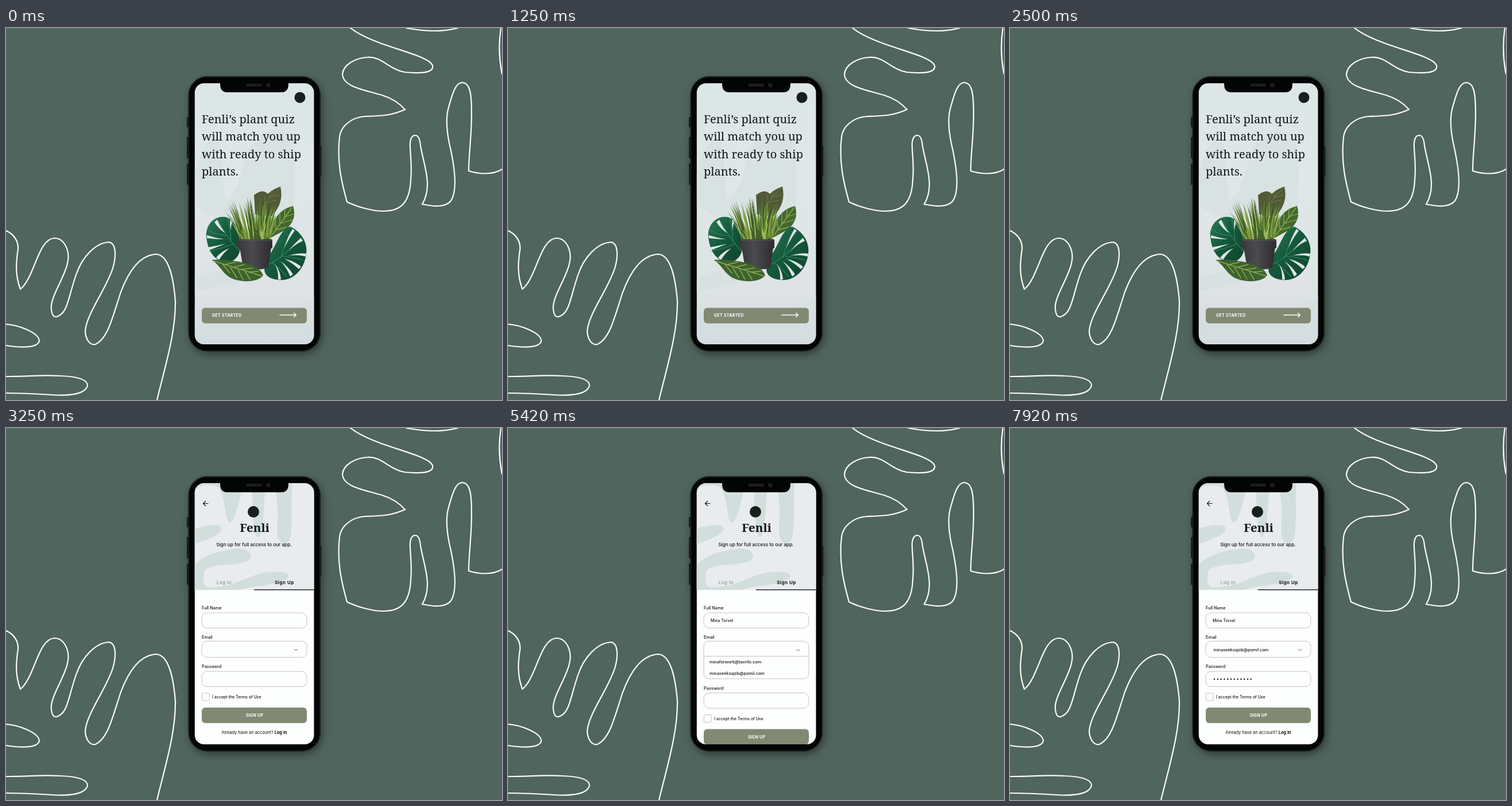
Write an HTML page that moves like this. It is 864 px wide and 648 px high and loops after 8000 ms.

```html
<!DOCTYPE html>
<html lang="en">
<head>
<meta charset="utf-8">
<title>Plant app sign-up</title>
<style>
  html, body { margin: 0; height: 100%; overflow: hidden; background: #50655d; }
  svg { display: block; width: 100vw; height: 100vh; }
  text { font: 500 7.3px Inter, sans-serif; fill: #111514; }
  .serif { font: 500 20px "Noto Serif", serif; }
  .brand { font: bold 20.5px "Noto Serif", serif; }
  .button { font-size: 7px; font-weight: 700; letter-spacing: .3px; fill: #fff; }
  .tab { font-size: 8px; font-weight: 700; letter-spacing: .5px; }
  .middle { text-anchor: middle; }
  .line { fill: none; stroke-linecap: round; stroke-linejoin: round; }
  .field { fill: #fdfefe; stroke: #bcc0b3; stroke-width: .9; }
  .phone { filter: drop-shadow(3px 5px 7px rgba(0, 0, 0, .42)); }
</style>
</head>
<body>
<svg viewBox="0 0 864 648">
  <defs>
    <clipPath id="screen"><rect x="328.800" y="96.200" width="207.700" height="454.800" rx="16"/></clipPath>
    <clipPath id="header"><rect x="328" y="95" width="209" height="187"/></clipPath>
    <clipPath id="list"><rect x="342" y="398" width="181" height="38"/></clipPath>
    <linearGradient id="paper" x2="0" y2="1">
      <stop stop-color="#dce6e7"/><stop offset=".4" stop-color="#e0e7e8"/><stop offset=".8" stop-color="#dee3e5"/><stop offset="1" stop-color="#d2d8dc"/>
    </linearGradient>
    <linearGradient id="leaf" x2="1" y2="1">
      <stop stop-color="#2b7a55"/><stop offset=".45" stop-color="#155a3d"/><stop offset="1" stop-color="#0e432d"/>
    </linearGradient>
    <linearGradient id="pot">
      <stop stop-color="#38373a"/><stop offset=".4" stop-color="#4c4a4e"/><stop offset="1" stop-color="#2d2c30"/>
    </linearGradient>
  </defs>

  <rect width="864" height="648" fill="#50655d"/>
  <g class="line" stroke="#fafcf9" stroke-width="2.200">
    <path d="M600 0C640 32 735 45 743 65C747 80 715 79 695 77C667 72 655 50 631 51C608 52 587 64 586 81C588 102 620 107 655 117C675 123 687 133 695 142C670 153 655 153 625 154C600 156 583 172 581 190C576 235 585 270 594 303C615 313 640 319 657 319C680 319 703 312 705 265C708 235 703 215 704 200C705 190 709 187 713 187C718 187 721 194 722 205C728 240 744 275 725 307"/>
    <path d="M725 307C745 311 765 313 775 301C789 280 779 230 772 200C768 180 766 155 771 138C777 118 782 95 795 95C808 96 811 112 811 150C811 190 806 220 806 249C822 254 848 257 864 246"/>
    <path d="M697 0Q750 10 787 0M862 0Q856 40 864 80"/>
    <path d="M0 353C12 358 22 370 21 385C18 405 15 428 25 455C50 435 56 366 85 366C103 367 112 390 107 410C102 435 76 470 79 490C80 500 83 504 88 503C108 497 108 470 122 430C132 400 155 374 180 373C193 376 191 400 187 415C178 450 138 500 138 530C140 545 147 553 156 551C178 540 185 505 200 460C215 420 235 395 262 394C285 396 292 440 295 475C296 530 277 590 263 648"/>
    <path d="M0 516C20 517 57 530 58 545C55 558 25 557 0 553M0 607C40 607 60 604 95 606C125 607 142 612 142 623C138 638 110 641 80 639C50 637 30 636 0 636"/>
  </g>

  <g class="phone">
    <path d="M317 155v18M317 190v37M317 236v37M547.500 205v53" stroke="#141817" stroke-width="3.500"/>
    <rect x="318.500" y="85" width="228.500" height="477.500" rx="32" fill="#030404" stroke="#181d1c" stroke-width="2"/>
  </g>

  <g clip-path="url(#screen)">
    <g id="welcome">
      <rect x="328" y="95" width="209" height="457" fill="url(#paper)"/>
      <g fill="#d6e0e2">
        <path d="M328 255C336 225 350 190 365 194C380 200 374 250 382 300C405 290 410 245 420 213C435 185 470 168 487 182C510 197 500 260 502 330H365L328 310Z" opacity=".6"/>
        <path d="M328 436C360 425 390 415 430 426C460 435 390 447 328 459ZM328 487C400 505 500 505 537 465V552H328Z" opacity=".6"/>
      </g>
      <circle cx="512" cy="121" r="9.500" fill="#17201d"/>
      <g id="headline"></g>

      <path d="M432 291Q447 279 456 289L450 325H434ZM440 327Q440 290 478 276Q485 306 462 328Z" fill="#515a37"/>
      <path d="M442 325Q453 299 477 278M450 308l2-17M459 297l3-13M453 304l19-4M462 294l14-3" class="line" stroke="#74784b"/>
      <path d="M460 366Q463 319 500 310Q508 335 486 352Z" fill="#42692d"/>
      <path d="M464 360L498 313M470 350l-1-16M477 341l0-18M485 332l1-17M470 352l18-5M479 340l20-6M488 328l13-4" class="line" stroke="#94a955" stroke-width="1.300"/>
      <g fill="url(#leaf)">
        <path d="M408 379C406 350 395 328 378 329C361 328 347 345 349 364C351 386 361 405 384 409C400 407 409 394 408 379Z"/>
        <path d="M456 398C470 385 476 350 495 346C513 354 526 373 523 393C520 421 500 439 480 439C457 439 445 428 452 411Z"/>
      </g>
      <path d="M407 388Q389 372 370 336M396 376Q375 384 355 389M384 362Q366 360 351 352M392 372Q391 350 386 333M453 414Q482 401 514 365M464 409Q478 420 489 433M482 398Q504 399 518 405M479 400Q485 374 498 352" class="line" stroke="#328460" stroke-width="1.200"/>
      <g fill="#e0e6e7">
        <path d="M382 357Q371 351 363 338L368 334Q374 348 382 357ZM392 353Q389 342 391 333L395 337Q391 344 392 353ZM380 368Q365 368 350 366L350 361Q365 366 380 368ZM382 376Q369 381 354 387L352 382Q368 379 382 376ZM389 384Q379 391 371 404L366 400Q376 388 389 384Z"/>
        <path d="M485 383Q490 365 499 350L503 353Q493 366 485 383ZM492 389Q503 374 514 366L517 371Q504 376 492 389ZM491 397Q508 391 523 393L522 398Q506 394 491 397ZM485 402Q503 406 514 416L510 420Q500 410 485 402ZM478 406Q491 415 500 429L495 433Q489 417 478 406ZM468 411Q478 423 479 438H474Q475 423 468 411Z"/>
      </g>
      <g id="grass"></g>
      <path d="M407 382H462L457 418Q434 424 413 418Z" fill="url(#pot)"/>
      <rect x="404" y="368" width="60" height="16" rx="2" fill="url(#pot)"/>
      <path d="M405 370H463" stroke="#5c5a5f"/>
      <path d="M358 404C385 402 442 408 448 431C439 443 411 444 393 436C377 428 372 412 358 404Z" fill="#3c632d"/>
      <path d="M362 406Q400 418 446 432M378 412l12 15M391 417l11 18M404 421l9 17M417 425l8 13M382 412l18-4M395 417l20-5M409 421l20-3M422 425l18-1" class="line" stroke="#91a654" stroke-width="1.500"/>

      <rect x="341" y="487.500" width="183" height="27" rx="6" fill="#828973"/>
      <text class="button" x="359" y="503">GET STARTED</text>
      <path d="M477 500H505.500M501.500 496.500L505.500 500L501.500 503.500" class="line" stroke="#fff" stroke-width="1.300"/>
    </g>

    <g id="signup">
      <rect x="328" y="95" width="209" height="457" fill="#fdfefe"/>
      <g clip-path="url(#header)">
        <rect x="328" y="95" width="209" height="187" fill="#e9ecee"/>
        <g fill="#d2dedc">
          <path d="M328 95H413C408 120 401 160 390 165C380 160 384 125 371 105C364 98 342 98 333 104L328 112Z"/>
          <path d="M428 95H452C449 130 449 188 439 190C429 189 430 135 428 95ZM469 95H499C495 130 503 195 489 200C472 204 471 185 473 160C475 135 469 115 469 95Z"/>
          <path d="M328 176C345 169 375 165 376 175C374 188 349 194 328 203ZM328 240C340 222 375 212 405 210C431 211 432 227 418 233C395 241 360 234 345 249L344 270Q348 280 360 277C400 277 415 258 455 251C485 249 497 253 490 262C471 276 430 273 408 282H328Z"/>
        </g>
      </g>
      <path d="M352 131.500H343.500M347.500 127.500L343.500 131.500L347.500 135.500" class="line" stroke="#111514" stroke-width="1.200"/>
      <circle cx="431" cy="146" r="10" fill="#17201d"/>
      <text class="brand middle" x="433" y="181">Fenli</text>
      <text class="middle" x="432" y="205.500" style="font-size:8.200px">Sign up for full access to our app.</text>
      <text class="tab middle" x="380" y="271.500" style="fill:#a0a8a8">Log In</text>
      <text class="tab middle" x="485" y="271.500">Sign Up</text>
      <path d="M432 281.700H537" stroke="#1d2925" stroke-width="1.400"/>

      <text x="341" y="316">Full Name</text>
      <rect class="field" x="341" y="322" width="183" height="26.500" rx="9"/>
      <text id="fullName" x="353" y="338.300" style="font-size:7px">Mina Torvel</text>
      <text x="341" y="367">Email</text>
      <rect id="emailBox" class="field" x="341" y="371.300" width="183" height="28.200" rx="9"/>
      <path id="chevron" class="line" stroke="#4b504e" stroke-width=".9"/>
      <text id="email" x="354.500" y="389">minaseeksajob@pomil.com</text>
      <g id="dropdown">
        <path d="M341 397.700H524" stroke="#bcc0a9" stroke-width=".9"/>
        <g clip-path="url(#list)"><g id="options">
          <text x="351" y="407.700">minaforwork@tavrilo.com</text>
          <text x="351" y="428">minaseeksajob@pomil.com</text>
        </g></g>
      </g>
      <g id="lower">
        <text x="341" y="418">Password</text>
        <rect class="field" x="341" y="424" width="183" height="26.500" rx="9"/>
        <path id="password" d="M356 437.500H421" class="line" stroke="#111514" stroke-width="2.500" stroke-dasharray="0 5.800"/>
        <rect class="field" x="341.300" y="462" width="13" height="13" rx="1.500"/>
        <text x="359" y="471" style="font-size:7px">I accept the Terms of Use</text>
        <rect x="341" y="487" width="183" height="27" rx="6" fill="#828973"/>
        <text class="button middle" x="433" y="503">SIGN UP</text>
        <text class="middle" x="432.500" y="532.500" style="font-size:7.400px;font-weight:400">Already have an account? <tspan font-weight="700">Log In</tspan></text>
      </g>
    </g>
  </g>

  <path d="M373 94H492V98Q492 112 479 112H386Q373 112 373 98Z" fill="#030404"/>
  <rect x="418.500" y="97" width="27.500" height="5" rx="2.500" fill="#1b1d1e"/>
  <circle cx="457" cy="99.500" r="4" fill="#1b1c20"/>
</svg>

<script>
const $ = id => document.getElementById(id);
const show = (id, on) => $(id).style.display = on ? '' : 'none';
const LOOP = 8000;
const at = { signup: 2750, name: 3750, open: 4250, close: 6750, password: 7350 };

$('headline').innerHTML = ['Fenli’s plant quiz', 'will match you up', 'with ready to ship', 'plants.']
  .map((line, i) => `<text class="serif" x="341" y="${166 + i * 30.3}">${line}</text>`).join('');

let seed = 7;
const random = () => (seed = seed * 16807 % 2147483647) / 2147483647;
const greens = ['#41602a', '#5c8030', '#7b9a3d', '#9bb557', '#365422'];

function blade(front) {
  const spread = random() * 2 - 1;
  const x = 434 + spread * 25;
  const tipX = 430 + spread * (front ? 27 : 44) + (random() - .5) * 12;
  const tipY = (front ? 337 : 293) + random() * (front ? 16 : 34) + spread * spread * 12;
  const half = front ? 2.6 : 1.2;
  const midX = x + (tipX - x) * .3;
  const midY = (370 + tipY) / 2;
  const color = greens[Math.floor(random() * greens.length)];
  return `<path fill="${color}" d="M${x - half} 371Q${midX - half} ${midY} ${tipX} ${tipY}Q${midX + half} ${midY} ${x + half} 371Z"/>`;
}
$('grass').innerHTML = Array.from({ length: 150 }, (_, i) => blade(i > 124)).join('');

function ease(t, from, to) {
  const p = Math.min(1, Math.max(0, (t - from) / (to - from)));
  return p * p * (3 - 2 * p);
}

function draw(now) {
  const t = now % LOOP;
  const open = t >= at.open && t < at.close;
  show('welcome', t < at.signup);
  show('signup', t >= at.signup);
  show('fullName', t >= at.name);
  show('dropdown', open);
  show('email', t >= at.close);
  show('password', t >= at.password);
  $('emailBox').setAttribute('height', open ? 65.5 : 28.2);
  $('chevron').setAttribute('d', open ? 'M502 388Q505 384 508 388' : 'M502 385.500Q505 389 508 385.500');
  $('lower').setAttribute('transform', `translate(0 ${open ? 37.6 : 0})`);
  $('options').setAttribute('transform', `translate(0 ${4.5 * ease(t, 4600, 6300)})`);
  requestAnimationFrame(draw);
}
requestAnimationFrame(draw);
</script>
</body>
</html>
```
